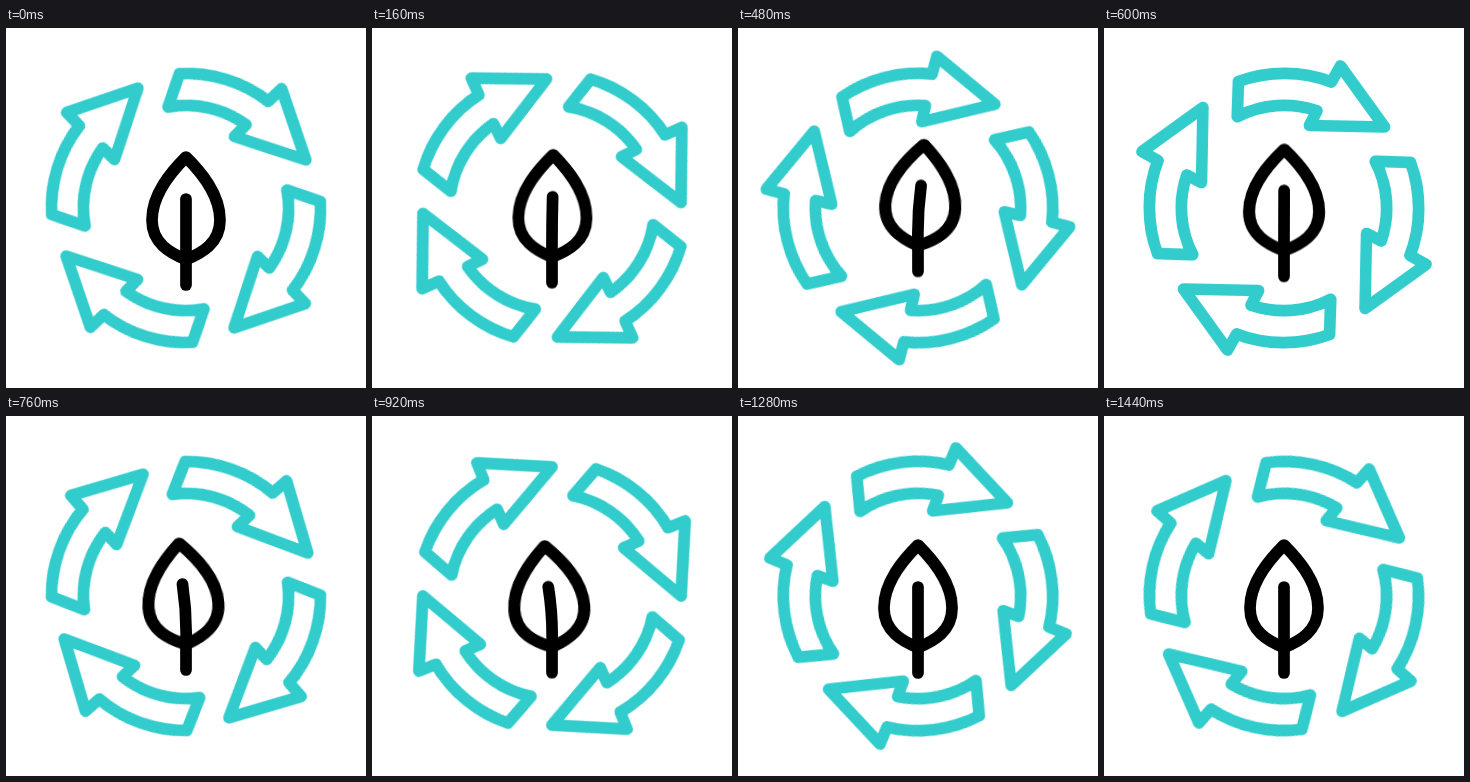
These frames come from a looping animation (360 by 360 pixels, 1.48 s). An HTML page:

```html
<!DOCTYPE html>
<html lang="en">
<head>
<meta charset="utf-8">
<title>Leaf and arrows</title>
<style>
  html, body { margin: 0; width: 100%; height: 100%; overflow: hidden; background: #fff; }
  svg { display: block; width: 100vw; height: 100vh; }
  path { fill: none; stroke-width: 11.7; stroke-linecap: round; stroke-linejoin: round; }
  #ring { stroke: #33cccc; }
  #plant { stroke: #000; }
</style>
</head>
<body>
<svg viewBox="0 0 360 360">
  <defs>
    <path id="arrow" d="M-45.5-126.5A134.5 134.5 0 0 1 47.5-126L56.5-142 100.5-81 25.5-82.5 33-97.2A102.6 102.6 0 0 0-46.7-91.3Z"/>
  </defs>
  <g transform="translate(180 180)">
    <g id="ring">
      <use href="#arrow"/>
      <use href="#arrow" transform="rotate(90)"/>
      <use href="#arrow" transform="rotate(180)"/>
      <use href="#arrow" transform="rotate(270)"/>
    </g>
  </g>
  <g transform="translate(180 229)">
    <g id="plant">
      <g id="lean">
        <g id="squash">
          <path d="M0-100C-15-85-34-63-34-37C-34-14-16-4 0 2.5C16-4 34-14 34-37C34-63 15-85 0-100Z"/>
        </g>
      </g>
      <path id="stem" d="M0 28V0Q0-29 0-58"/>
    </g>
  </g>
</svg>
<script>
  const LOOP = 1480;
  const STEPS = 37;
  const SMOOTH = 'cubic-bezier(.42,0,.58,1)';
  const SETTLE = 'cubic-bezier(.25,0,.45,1)';

  // rows: [time in ms, value, easing to the next row]
  function play(id, prop, rows, format) {
    const frames = rows.map(([ms, value, easing = SMOOTH]) =>
      ({ offset: ms / LOOP, [prop]: format(value), easing }));
    document.getElementById(id).animate(frames, {
      duration: LOOP,
      delay: -2,
      iterations: Infinity,
      easing: `steps(${STEPS})`
    });
  }

  const sway = [[0, 0], [80, 0], [370, 1], [840, -1], [1290, 0], [LOOP, 0]];

  play('ring', 'transform', [[0, 17, 'linear'], [LOOP, 197]], a => `rotate(${a}deg)`);
  play('plant', 'transform', [[0, 0], [80, 0], [380, -15.5, SETTLE], [1000, 0], [LOOP, 0]],
    y => `translateY(${y}px)`);
  play('lean', 'transform', sway, s => `rotate(${s * 4.5}deg)`);
  play('squash', 'transform', [[0, 0], [80, 0], [500, 1], [1000, 1], [1320, 0], [LOOP, 0]],
    s => `scale(${1 + s * .03}, ${1 - s * .01})`);
  play('stem', 'd', sway, s => `path("M0 28V0Q${-s} -29 ${s * 4} -58")`);
</script>
</body>
</html>
```
